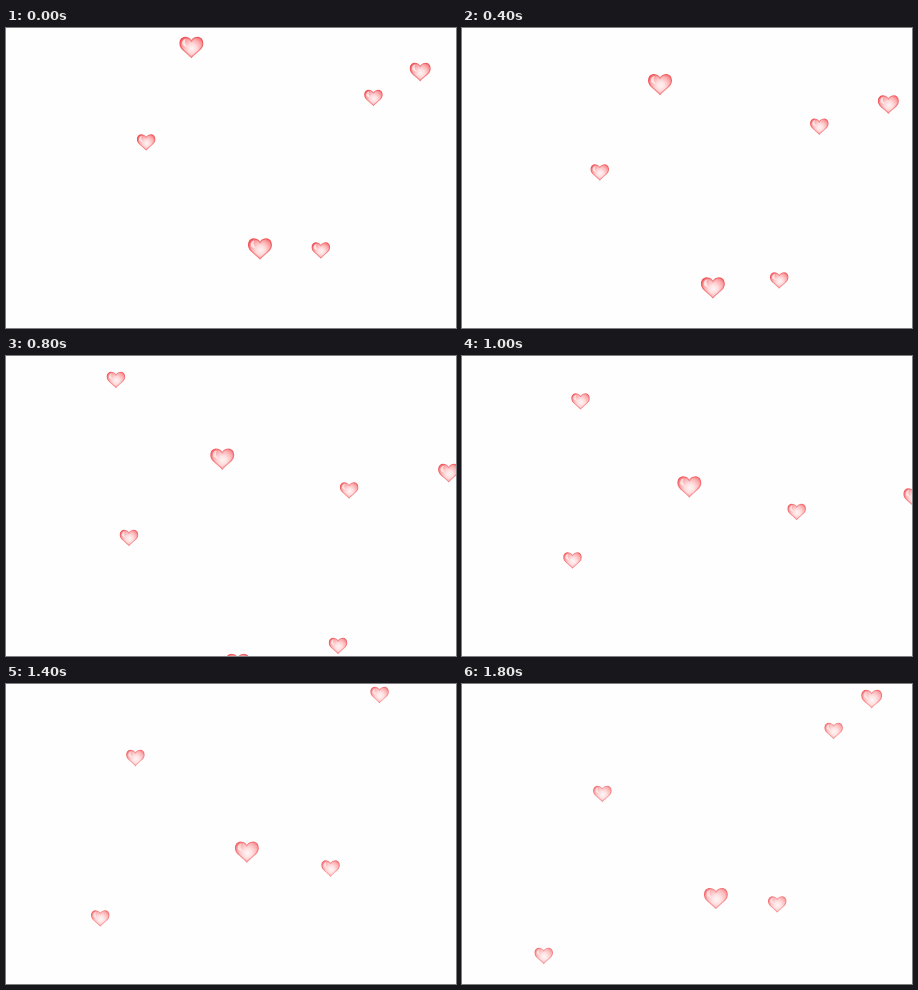
An HTML page with a canvas that plays this animation: 450x300 px, repeating every 2 s.

```html
<!DOCTYPE html>
<html>
<head>
<meta charset="utf-8">
<title>Falling hearts</title>
<style>
  html, body { margin: 0; height: 100%; overflow: hidden; background: #fefefe; }
  canvas { display: block; }
</style>
</head>
<body>
<canvas id="stage" width="450" height="300"></canvas>
<script>
const ctx = document.getElementById('stage').getContext('2d');
const STEP = 200, STEPS = 10, TICKS_PER_STEP = 2.4;
const BIG = 24, MEDIUM = 21, SMALL = 18.5;
const RIGHT = 1, LEFT = -1;

// Fall speed and sway width are in heart sizes; rate is in radians per tick.
const gentle = { speed: .387, sway: 1.9, rate: .082 };
const brisk = { speed: .405, sway: 1.62, rate: .143 };

// Each heart crosses the middle of its sway, x, at tick mid.
const hearts = [
  { size: BIG, x: 215.5, y: 19.5, mid: 8.8, heading: RIGHT, pace: gentle },
  { size: BIG, x: 215.5, y: 221, mid: 12, heading: LEFT, pace: brisk },
  { size: MEDIUM, x: 434.5, y: 44, mid: 6.5, heading: RIGHT, pace: gentle },
  { size: MEDIUM, x: 441, y: -155.5, mid: 32, heading: RIGHT, pace: gentle },
  { size: SMALL, x: 346, y: 70, mid: 8, heading: LEFT, pace: gentle },
  { size: SMALL, x: 344.5, y: 222.5, mid: 12, heading: RIGHT, pace: brisk },
  { size: SMALL, x: 338.5, y: -103.5, mid: 36, heading: LEFT, pace: gentle },
  { size: SMALL, x: 110.5, y: 114.5, mid: 12, heading: LEFT, pace: brisk },
  { size: SMALL, x: 112.8, y: -40.5, mid: 10, heading: RIGHT, pace: gentle }
];

const outline = new Path2D(
  'M0-.31C-.12-.5-.5-.52-.5-.16C-.5.1-.18.22 0 .45C.18.22.5.1.5-.16C.5-.52.12-.5 0-.31Z');
const shine = new Path2D('M-.37-.1C-.42-.27-.32-.36-.22-.34C-.3-.26-.26-.12-.16 0Z');

const glow = ctx.createRadialGradient(.03, .04, 0, .03, .04, .6);
glow.addColorStop(0, '#fff4f4');
glow.addColorStop(.3, '#ffdcdd');
glow.addColorStop(.65, '#fba9ab');
glow.addColorStop(1, '#f0555a');

function drawHeart(x, y, size) {
  ctx.save();
  ctx.translate(x, y);
  ctx.scale(size, size);
  ctx.clip(outline);
  ctx.fillStyle = glow;
  ctx.fill(outline);
  ctx.strokeStyle = 'rgba(236, 60, 64, .45)';
  ctx.lineWidth = .1;
  ctx.stroke(outline);
  ctx.fillStyle = 'rgba(255, 255, 255, .7)';
  ctx.fill(shine);
  ctx.restore();
}

function draw() {
  const step = Math.floor(performance.now() / STEP) % STEPS;
  const tick = Math.floor(step * TICKS_PER_STEP);
  ctx.clearRect(0, 0, 450, 300);
  ctx.globalAlpha = 1 - .025 * step;
  for (const { size, x, y, mid, heading, pace } of hearts) {
    const swing = heading * pace.sway * Math.sin((tick - mid) * pace.rate);
    drawHeart(x + size * swing, y + size * pace.speed * tick, size);
  }
  requestAnimationFrame(draw);
}
draw();
</script>
</body>
</html>
```
